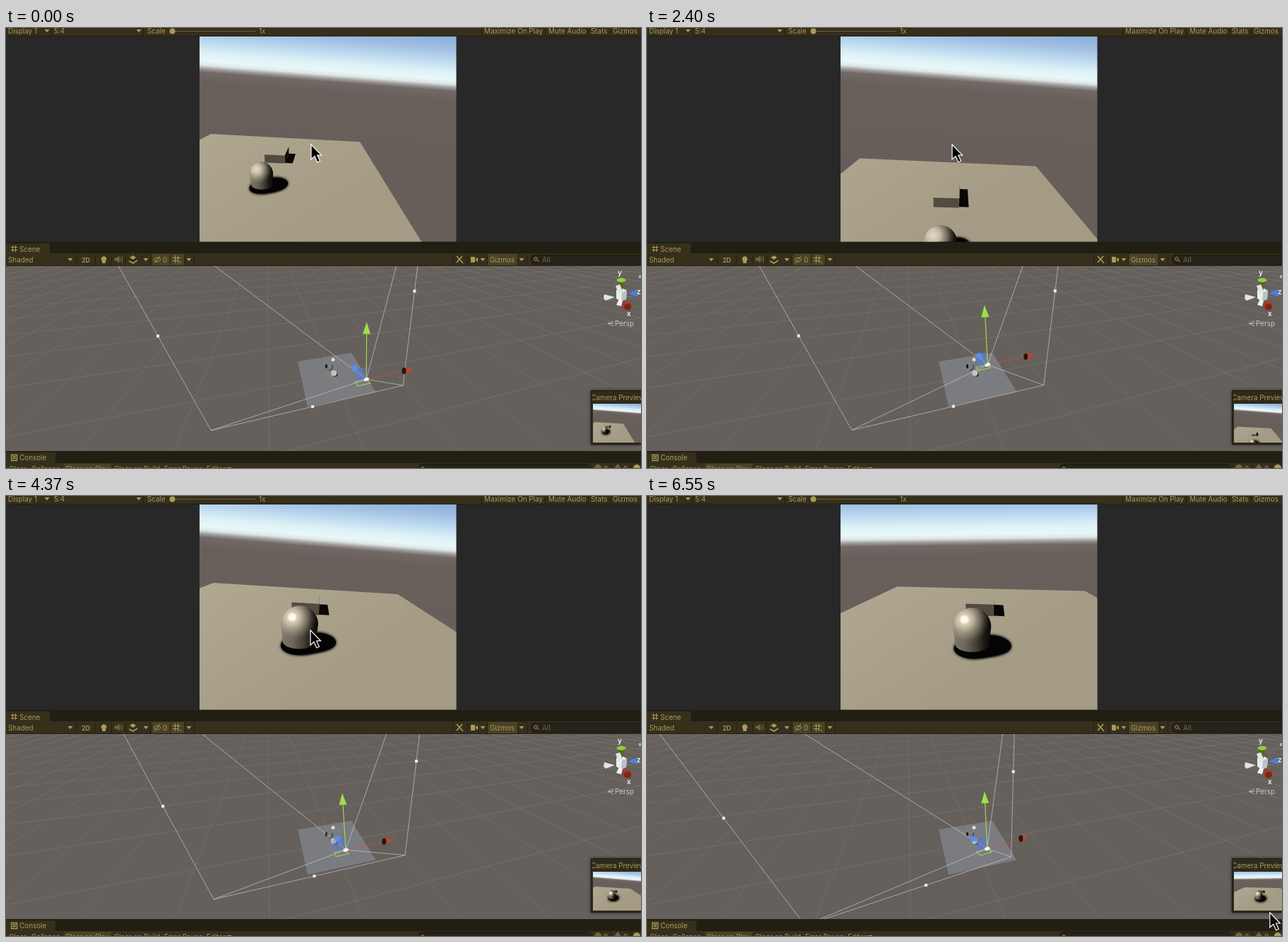
Recreate the animation shown at these times as an HTML page with a canvas. Size 899 px wide and 623 px high, loop 6.62 s.

```html
<!DOCTYPE html>
<html lang="en">
<head>
<meta charset="utf-8">
<title>Editor camera</title>
<style>
html, body { margin: 0; width: 100%; height: 100%; overflow: hidden; background: #282828; }
canvas, svg { position: absolute; left: 0; top: 0; width: 899px; height: 623px; }
text { font: 9.9px Inter, "Open Sans", sans-serif; fill: #aa9a5b; }
.dim { fill: #6f663f; }
.pale { fill: #c9c6bf; }
.axis { font-weight: 600; fill: #f1f1ee; }
.bar { fill: #352f1b; }
.strip { fill: #211e13; }
.on { fill: #4a4226; }
.field { fill: #27231a; stroke: #191710; }
.sep { stroke: #221f14; }
.ico { fill: #aa9a5b; }
.line { fill: none; stroke: #aa9a5b; }
</style>
</head>
<body>
<canvas id="view" width="899" height="623"></canvas>
<svg viewBox="0 0 899 623">
  <defs><path id="dn" class="ico" d="M-3.5-2h7L0 2.2z"/></defs>

  <rect class="bar" width="899" height="11"/>
  <rect class="strip" y="11" width="899" height="1"/>
  <text x="3" y="8">Display 1</text><use href="#dn" x="58" y="4"/>
  <text x="68" y="8">5:4</text><use href="#dn" x="188" y="4"/>
  <text x="200" y="8">Scale</text>
  <path d="M235 4.5H353" stroke="#6b613a"/><circle class="ico" cx="235.5" cy="4.5" r="4"/>
  <text x="358" y="8">1x</text>
  <path class="sep" d="M64.5 0V11M194.5 0V11M673.5 0V11M763.5 0V11M824.5 0V11M855.5 0V11"/>
  <text x="677" y="8">Maximize On Play</text><text x="768" y="8">Mute Audio</text>
  <text x="828" y="8">Stats</text><text x="859" y="8">Gizmos</text>

  <rect class="strip" y="303" width="899" height="16"/>
  <rect class="bar" y="305" width="62" height="15"/>
  <path class="line" d="M9.5 308v9M13.5 308v9M7 310.5h9M7 314.5h9"/>
  <text x="19" y="317">Scene</text>
  <rect class="bar" y="319" width="899" height="17"/>
  <rect class="strip" y="336" width="899" height="1"/>
  <text x="3" y="332">Shaded</text><use href="#dn" x="91" y="328"/>
  <rect class="on" x="207" y="320" width="25" height="16"/><rect class="on" x="233" y="320" width="19" height="16"/>
  <rect class="on" x="682" y="320" width="42" height="16"/>
  <path class="sep" d="M99.5 320v16M126.5 320v16M149.5 320v16M169.5 320v16M204.5 320v16M232.5 320v16M252.5 320v16M266.5 320v16M632.5 320v16M653.5 320v16M681.5 320v16M724.5 320v16M737.5 320v16"/>
  <text x="107" y="332" style="font-size:9px;font-weight:600">2D</text>
  <path class="ico" d="M136 330a3.8 3.8 0 1 1 5 0v3h-5z"/>
  <path d="M154 326h3l3-3v9l-3-3h-3zM162 324v7M164.5 323v9" fill="#6f663f" stroke="#6f663f"/>
  <path class="ico" d="M175 325l5-3 4 3-4 3zM174 329l6 3 6-4v2l-6 4-6-3z"/>
  <use href="#dn" x="198" y="328"/>
  <path class="line" d="M209 328q5-6 10 0q-5 6-10 0M210 333l8-10"/><text x="222" y="332">0</text>
  <path class="line" d="M239.5 322v11M243.5 322v11M236 325.5h11M236 329.5h7M245 330l3 3"/>
  <use href="#dn" x="259" y="328"/>
  <path class="line" stroke-width="1.7" d="M638 323l9 10M646 323l-8 9"/>
  <path class="ico" d="M658 324h6v8h-6zM665 327l3-2v6l-3-2z"/>
  <use href="#dn" x="675" y="328"/><text x="685" y="332">Gizmos</text><use href="#dn" x="730" y="328"/>
  <rect class="field" x="743.5" y="321.5" width="170" height="13" rx="5"/>
  <circle class="line" cx="750" cy="327" r="2.3"/><path class="line" d="M752 329l3 2"/>
  <text class="dim" x="759" y="332">All</text>

  <text class="axis" x="866" y="350">y</text><text class="axis" x="893" y="377">z</text><text class="axis" x="879" y="408">x</text>
  <path d="M860 415l-8 3.5 8 3.5M852 418.5h8" fill="none" stroke="#c9c6bf" stroke-width=".8"/>
  <text class="pale" x="862" y="422">Persp</text>
  <clipPath id="card"><rect x="830" y="515" width="69" height="17"/></clipPath>
  <text x="828" y="527" clip-path="url(#card)">Camera Preview</text>

  <rect class="strip" y="599" width="899" height="17"/>
  <rect class="bar" y="601" width="70" height="15"/>
  <path class="line" d="M7.5 604.5h8v8h-8zM9 607h5M9 609.5h5" stroke-width="1.3"/>
  <text x="19" y="612">Console</text>
  <rect class="bar" y="616" width="899" height="7"/>
  <rect class="on" x="82" y="617" width="67" height="6"/>
  <text x="4" y="628">Clear</text><text x="36" y="628">Collapse</text><text x="84" y="628">Clear on Play</text>
  <text x="153" y="628">Clear on Build</text><text x="224" y="628">Error Pause</text><text x="284" y="628">Editor</text>
  <use href="#dn" x="316" y="624"/>
  <rect class="field" x="584.5" y="617.5" width="242" height="13" rx="5"/>
  <circle class="line" cx="590" cy="624" r="2.3"/>
  <path class="sep" d="M828.5 616v7M856.5 616v7M884.5 616v7"/>
  <circle class="dim" cx="838" cy="623" r="5"/><path class="dim" d="M866 617l6 8h-12z"/><circle class="ico" cx="893" cy="623" r="5"/>
  <text x="846" y="628">0</text><text x="874" y="628">0</text>

  <circle id="tap" r="10" fill="#e0443c" opacity=".85"/>
  <path id="arrow" d="M0 0V21L5 16.5 8.8 25 12.5 23.3 8.7 15.2H14.5z" stroke="#fff" stroke-width="1.2"/>
</svg>
<script>
const LOOP = 6620, STEP = LOOP / 94, RAD = Math.PI / 180;
const FOCAL = 251.6, MID_X = 456, MID_Y = 157;
const ctx = document.getElementById('view').getContext('2d');
const tap = document.getElementById('tap'), arrow = document.getElementById('arrow');

// time, camera x, y, z, yaw, pitch
const flight = [
  [0, 1.96, 4.08, -6.53, 4, 19],
  [1479, 1.67, 3.27, -4.26, 4, 19],
  [2395, .3, 4.64, -4.16, 4, 19],
  [3451, .41, 2.93, -4.76, 4, 19],
  [4367, .32, 2.4, -4.5, 4.75, 19.6],
  [5070, .4, 2.4, -4.4, -3.5, 20.3],
  [5350, .4, 2.4, -4.4, -21, 20],
  [5634, .4, 2.4, -4.4, 15.1, 18.5],
  [6200, .45, 2.4, -4.3, -8, 20.3]];
// time, x, y
const mouse = [
  [0, 432, 165], [3380, 432, 165], [3451, 437, 178], [4367, 431, 190], [5350, 340, 190],
  [5634, 507, 177], [5700, 507, 177], [6550, 882, 590]];

function at(keys, t) {
  const i = keys.findIndex(k => k[0] > t);
  if (i < 0) return keys[keys.length - 1].slice(1);
  const a = keys[i - 1], b = keys[i], u = (t - a[0]) / (b[0] - a[0]);
  return a.map((v, j) => v + (b[j] - v) * u).slice(1);
}

const dot = (a, b) => a[0] * b[0] + a[1] * b[1] + a[2] * b[2];
const mix = (a, u, b, v) => a.map((n, i) => n * u + b[i] * v);

function camera(t) {
  const [x, y, z, yaw, pitch] = at(flight, t);
  const roll = (2.7 + .42 * yaw) * RAD;   // turning about a tilted axis leans the horizon
  const sy = Math.sin(yaw * RAD), cy = Math.cos(yaw * RAD);
  const sp = Math.sin(pitch * RAD), cp = Math.cos(pitch * RAD);
  const s = Math.sin(roll), c = Math.cos(roll);
  const side = [cy, 0, -sy], up = [sy * sp, cp, cy * sp];
  return {
    pos: [x, y, z], roll, horizon: FOCAL * sp / cp,
    ahead: [sy * cp, -sp, cy * cp], right: mix(side, c, up, s), up: mix(up, c, side, -s)
  };
}

// camera space, then screen of the game view
function local(cam, p) {
  const d = mix(p, 1, cam.pos, -1);
  return [dot(d, cam.right), dot(d, cam.up), dot(d, cam.ahead)];
}
const screen = ([x, y, z]) => [MID_X + FOCAL * x / z, MID_Y - FOCAL * y / z];

function solid(cam, fill, points) {
  const near = .05, out = [], p = points.map(v => local(cam, v));
  p.forEach((a, i) => {
    const b = p[(i + 1) % p.length];
    if (a[2] > near) out.push(a);
    if ((a[2] > near) !== (b[2] > near)) {
      const u = (near - a[2]) / (b[2] - a[2]);
      out.push(mix(a, 1 - u, b, u));
    }
  });
  poly(fill, out.map(screen));
}

// fixed perspective of the scene view
function project([x, y, z]) {
  const w = 4.41 + .031 * x + .114 * z - .129 * y;
  return [(2042 + 51.75 * x + 42.05 * z - 57.9 * y) / w, 265 + (1000 - 62.8 * y) / w];
}

function trace(points, close) {
  ctx.beginPath();
  points.forEach(p => ctx.lineTo(p[0], p[1]));
  if (close) ctx.closePath();
}
function poly(fill, points) { trace(points, true); ctx.fillStyle = fill; ctx.fill(); }
function line(color, points, close) { trace(points, close); ctx.strokeStyle = color; ctx.stroke(); }
function oval(fill, x, y, rx, ry = rx, turn = 0) {
  ctx.beginPath(); ctx.ellipse(x, y, rx, ry, turn, 0, 7);
  ctx.fillStyle = fill; ctx.fill();
}
function rect(fill, x, y, w, h) { ctx.fillStyle = fill; ctx.fillRect(x, y, w, h); }
function shade(g, ...stops) {
  for (let i = 0; i < stops.length; i += 2) g.addColorStop(stops[i], stops[i + 1]);
  return g;
}
const flat = (x1, x2, z1, z2, y = 0) => [[x1, y, z1], [x2, y, z1], [x2, y, z2], [x1, y, z2]];

function drawSky(cam) {
  ctx.save();
  ctx.translate(MID_X, MID_Y);
  ctx.rotate(cam.roll);
  ctx.translate(0, -cam.horizon);
  rect(shade(ctx.createLinearGradient(0, -80, 0, 120),
    0, '#86a4d0', .125, '#9dbde2', .225, '#c0dcf0', .29, '#dcf0f6', .35, '#e8f8f8',
    .38, '#dde6e6', .405, '#a09c9b', .43, '#716966', .5, '#69605c', 1, '#685e59'),
    -300, -200, 600, 700);
  ctx.restore();
}

function drawBox(cam, sand) {
  const l = -.45, r = .5, f = 1.3, b = 2.48, h = .42;
  solid(cam, '#080706', flat(r, .87, f + .05, b));
  solid(cam, '#0b0908', [[r, 0, f], [r, h, f], [r, h, b], [r, 0, b]]);
  solid(cam, sand, flat(l, r, f, b, h));
  solid(cam, '#524c40', [[l, 0, f], [l, h, f], [r, h, f], [r, 0, f]]);
}

function drawCapsule(cam) {
  const size = .44, cz = -.65;
  ctx.shadowColor = '#000';
  ctx.shadowBlur = 4;
  for (let s = 0; s <= 1; s += .125) {
    const ring = Array.from({ length: 24 }, (_, i) =>
      [.5 * s + size * Math.cos(i * 15 * RAD), 0, cz + .2 * s + size * Math.sin(i * 15 * RAD)]);
    solid(cam, '#050404', ring);
  }
  ctx.shadowBlur = 0;

  const head = local(cam, [0, .55, cz]), foot = local(cam, [0, .08, cz]);
  const [x, y] = screen(head), [fx, fy] = screen(foot);
  const r = size * FOCAL / head[2], fr = size * .92 * FOCAL / foot[2];
  ctx.beginPath();
  ctx.arc(x, y, r, Math.PI, 0);
  ctx.ellipse(fx, fy, fr, fr * .45, 0, 0, Math.PI);
  ctx.closePath();
  ctx.fillStyle = shade(ctx.createLinearGradient(x - r, 0, x + r, 0),
    0, '#80786a', .3, '#6f685a', .6, '#464036', .82, '#1b1815', 1, '#0b0908');
  ctx.fill();
  const hx = x - r * .4, hy = y - r * .38;
  ctx.save();
  ctx.clip();
  oval(shade(ctx.createRadialGradient(hx, hy, 0, hx, hy, r * 1.3),
    0, '#e6dcc4', .3, 'rgba(208,198,176,.93)', .65, 'rgba(160,151,131,.55)', 1, 'rgba(110,102,88,0)'),
    hx, hy, r * 1.3);
  // the low camera catches the reflection of the sun
  ctx.globalAlpha = Math.min(1, Math.max(0, (3.1 - cam.pos[1]) / .6));
  oval(shade(ctx.createRadialGradient(hx, hy, 0, hx, hy, r * .3),
    0, '#fffdf2', .55, '#fdf8e8', 1, 'rgba(240,230,210,0)'), hx, hy, r * .3);
  ctx.restore();
}

function drawGame(cam) {
  ctx.save();
  ctx.beginPath();
  ctx.rect(274, 12, 363.5, 290.5);
  ctx.clip();
  drawSky(cam);
  const sand = shade(ctx.createLinearGradient(300, 120, 420, 302), 0, '#b0a790', 1, '#a49b85');
  solid(cam, sand, flat(-5, 5, -5, 5));
  drawBox(cam, sand);
  drawCapsule(cam);
  ctx.restore();
}

function drawGrid() {
  // two families of ground lines, one per vanishing point
  const top = 265, nearX = 369, farX = 1670;
  for (let k = -24; k <= 24; k++) line('rgba(190,190,190,.13)', [[nearX, top], [373 + 134 * k, 598]]);
  for (let k = 0; k < 14; k++) {
    const y = top + 1 / (.00293 + .00116 * k), m = (y - top) / (nearX - farX);
    line(`rgba(190,190,190,${.16 - k * .01})`, [[0, y - m * nearX], [899, y + m * (899 - nearX)]]);
  }
}

function drawFrustum(cam) {
  const far = (u, v) => {
    const dir = mix(mix(cam.ahead, 1, cam.right, u * .7217), 1, cam.up, v * .5774);
    return project(mix(cam.pos, 1, dir, 1000));
  };
  const wire = 'rgba(225,222,215,.7)', eye = project(cam.pos);
  ctx.lineWidth = .8;
  const corners = [far(-1, 1), far(-1, -1), far(1, -1), far(1, 1)];
  line(wire, corners, true);
  corners.forEach(c => line(wire, [eye, c]));
  [far(-1, 0), far(1, 0), far(0, -1)].forEach(([x, y]) => rect('#f1f0ed', x - 2, y - 2, 4, 4));
}

function drawMove(cam) {
  const [x, y, z] = cam.pos, reach = 1.75 * (4.41 + .031 * x + .114 * z - .129 * y);
  const eye = project(cam.pos);
  const tip = (r, u, f) => project(mix(mix(mix(cam.pos, 1, cam.right, r * reach), 1, cam.up, u * reach), 1, cam.ahead, f * reach));
  const cone = (fill, a, b, w) => {
    const d = Math.hypot(b[0] - a[0], b[1] - a[1]), nx = (a[1] - b[1]) / d * w, ny = (b[0] - a[0]) / d * w;
    poly(fill, [[a[0] + nx, a[1] + ny], b, [a[0] - nx, a[1] - ny]]);
  };
  ctx.lineWidth = 1.1;
  poly('rgba(80,120,220,.45)', [eye, tip(-.25, 0, 0), tip(-.25, .25, 0), tip(0, .25, 0)]);
  line('#a9c958', [eye, tip(-.25, 0, 0), tip(-.25, 0, -.2), tip(0, 0, -.2)], true);
  const blue = tip(0, 0, .75), green = tip(0, .82, 0), red = tip(.84, 0, 0);
  line('#5f86dc', [eye, blue]);
  oval('#5b8ceb', blue[0], blue[1], 4.5, 4);
  line('#a5dd52', [eye, green]);
  cone('#9fe04a', green, tip(0, 1, 0), 5.5);
  line('rgba(215,74,48,.6)', [eye, red]);
  cone('#c8452c', red, tip(1.04, 0, 0), 5);
  oval('#2c120c', red[0], red[1], 3, 4.6);
  oval('#f6f4ea', eye[0], eye[1], 4, 2.4, -.3);
}

function drawAxes() {
  poly('#e9efed', [[864, 371], [872, 368], [879, 372], [878, 384], [870, 387], [864, 383]]);
  poly('#b9c3c2', [[872, 374], [879, 372], [878, 384], [871, 387]]);
  poly('#56652a', [[865, 358], [877, 358], [872, 373], [870, 373]]);
  oval('#8fd13c', 871, 357, 6.5, 3);
  poly('#dfe5e3', [[862, 381], [847, 377], [846, 383], [849, 386]]);
  poly('#dfe5e3', [[863, 365], [869, 363], [873, 372], [867, 376]]);
  poly('#eef2f0', [[864, 392], [868, 384], [873, 386], [871, 394]]);
  poly('#4c7de0', [[880, 376], [893, 370], [894, 380]]);
  poly('#a63b26', [[873, 387], [884, 388], [886, 395], [880, 400], [873, 397]]);
  oval('#7d2817', 880, 395, 5, 4.5);
  rect('#a8b9bb', 896, 350, 3, 4);
}

function drawScene(cam) {
  ctx.save();
  ctx.beginPath();
  ctx.rect(0, 337, 899, 262);
  ctx.clip();
  rect('#66605c', 0, 337, 899, 262);
  ctx.lineWidth = 1;
  drawGrid();
  poly('rgba(132,138,146,.68)', flat(-5, 5, -5, 5).map(project));
  oval('#15130f', 453.5, 479, 1.5, 3);
  line('#2b2823', [[457, 485], [462, 482], [462, 477]]);
  const [bx, by] = project([-.1, .9, -.65]);
  oval('#35312b', bx + 2, by + 2, 3.5, 3);
  oval('#c9c2b5', bx, by, 4);
  oval('#e9dfb5', 463, 469.5, 2.5);
  drawFrustum(cam);
  drawMove(cam);
  drawAxes();

  ctx.shadowColor = 'rgba(0,0,0,.6)';
  ctx.shadowBlur = 5;
  rect('#1a1811', 828, 513, 80, 77);
  ctx.shadowBlur = 0;
  rect('#2f2a1b', 829, 514, 80, 75);
  ctx.translate(831, 532);
  ctx.scale(.189, .189);
  ctx.translate(-274, -12);
  drawGame(cam);
  ctx.restore();
}

function frame(now) {
  const t = Math.floor((now % LOOP + 8) / STEP) % 94 * STEP;
  const cam = camera(t), [x, y] = at(mouse, t);
  rect('#282828', 0, 12, 899, 291);
  drawGame(cam);
  drawScene(cam);
  arrow.setAttribute('transform', `translate(${x} ${y})`);
  tap.setAttribute('transform', `translate(${x} ${y})`);
  tap.style.visibility = t > 5550 && t < 5720 ? 'visible' : 'hidden';
  requestAnimationFrame(frame);
}
requestAnimationFrame(frame);
</script>
</body>
</html>
```
